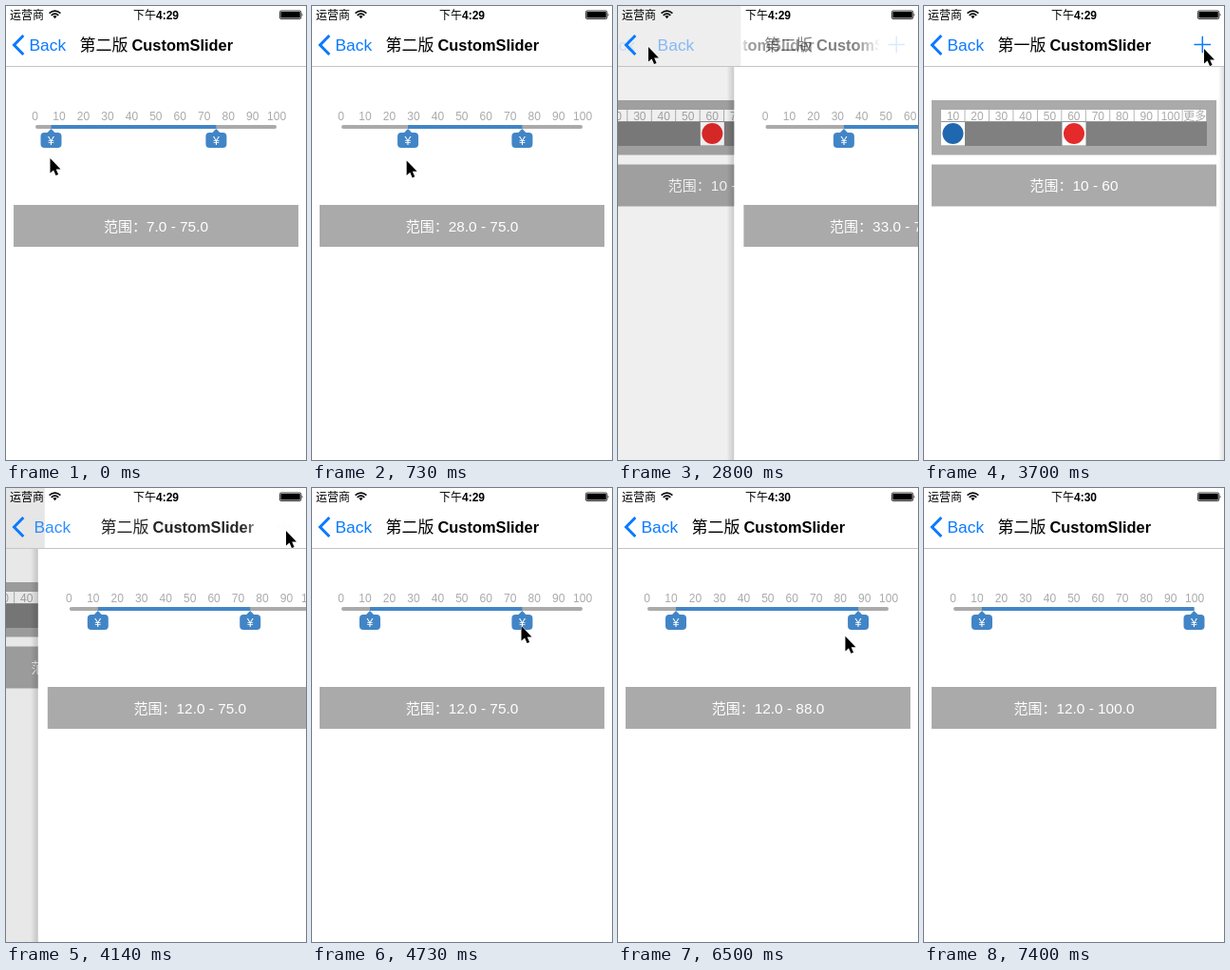
Animation of 316x477 px, one loop 8120 ms. Source, as an HTML page:

```html
<!DOCTYPE html>
<html lang="zh-CN">
<head>
<meta charset="utf-8">
<title>CustomSlider</title>
<style>
  html, body { margin: 0; width: 100%; height: 100%; overflow: hidden; background: #fff; }
  svg { display: block; width: 100vw; height: 100vh; }
  text { font-family: "Liberation Sans", "Noto Sans CJK SC", "Noto Sans CJK", sans-serif; white-space: pre; }
  .mid { text-anchor: middle; }
  .status { font-size: 12px; }
  .bold { font-weight: 700; }
  .title .han { font-size: 17px; font-weight: 500; }
  .title .bold { font-size: 16.4px; }
  .back { font-size: 17.4px; fill: #0a7aff; }
  .tick { font-size: 12px; fill: #aaa; text-anchor: middle; }
  .range { font-size: 15px; font-weight: 300; fill: #fff; text-anchor: middle; }
  .range tspan { font-size: 15.4px; }
  .grey { fill: #aaa; }
  .blue { fill: #4285c6; }
</style>
</head>
<body>
<svg viewBox="0 0 316 477">
  <defs>
    <linearGradient id="edge">
      <stop offset="0" stop-opacity="0"/>
      <stop offset="1" stop-opacity=".16"/>
    </linearGradient>
    <linearGradient id="fadeL" gradientUnits="userSpaceOnUse" x1="68" x2="78">
      <stop offset="0" stop-color="#000"/>
      <stop offset="1" stop-color="#fff"/>
    </linearGradient>
    <linearGradient id="fadeR" gradientUnits="userSpaceOnUse" x1="250" x2="276">
      <stop offset="0" stop-color="#fff"/>
      <stop offset="1" stop-color="#000"/>
    </linearGradient>
    <mask id="maskL" maskUnits="userSpaceOnUse" x="0" y="0" width="316" height="64">
      <rect width="316" height="64" fill="url(#fadeL)"/>
    </mask>
    <mask id="maskR" maskUnits="userSpaceOnUse" x="0" y="0" width="316" height="64">
      <rect width="316" height="64" fill="url(#fadeR)"/>
    </mask>
    <g id="knob">
      <path class="blue" d="M-4.5 133.5L0 129L4.5 133.5Z"/>
      <rect class="blue" x="-11" y="133" width="22" height="16" rx="4"/>
    </g>
  </defs>

  <g id="first">
    <rect x="-2" width="320" height="477" fill="#fff"/>
    <rect class="grey" x="8" y="99" width="300" height="57.5"/>
    <rect x="18" y="121.5" width="280" height="25.5" fill="#808080"/>
    <g id="cells"></g>
    <rect x="18" y="122" width="25" height="24.5" fill="#fff"/>
    <circle cx="30.5" cy="134" r="11" fill="#1f67ae"/>
    <rect x="145.5" y="122" width="25" height="24.5" fill="#fff"/>
    <circle cx="158" cy="134" r="11" fill="#e42a2a"/>
    <rect class="grey" x="8" y="166.5" width="300" height="44"/>
    <text class="range" x="158" y="194.3">范围：<tspan>10 - 60</tspan></text>
  </g>
  <path id="dim"/>

  <g id="second">
    <rect x="-10" y="64" width="8" height="413" fill="url(#edge)"/>
    <rect x="-2" width="330" height="477" fill="#fff"/>
    <g id="ticks"></g>
    <rect class="grey" x="31" y="125" width="254" height="4" rx="2"/>
    <rect id="span" class="blue" y="125" height="4"/>
    <g id="low"><use href="#knob"/><text class="mid" y="145.6" font-size="12.5" fill="#fff">¥</text></g>
    <g id="high"><use href="#knob"/><text class="mid" y="145.6" font-size="12.5" fill="#fff">¥</text></g>
    <rect class="grey" x="8" y="209" width="300" height="44"/>
    <text class="range" x="158" y="236.6">范围：<tspan id="value"></tspan></text>
  </g>

  <path id="barDim"/>
  <rect y="63" width="316" height="1" fill="#c4c4c4"/>
  <g mask="url(#maskL)">
    <g id="title1" class="title">
      <text class="han" x="77.5" y="47.3">第一版</text><text class="bold" x="132.5" y="47">CustomSlider</text>
    </g>
  </g>
  <g mask="url(#maskR)">
    <g id="title2" class="title">
      <text class="han" x="77.5" y="47.3">第二版</text><text class="bold" x="132.5" y="47">CustomSlider</text>
    </g>
  </g>
  <text id="back1" class="back" x="24.5" y="47">Back</text>
  <text id="back2" class="back" x="24.5" y="47">Back</text>
  <path d="M18.3 31L8.5 41L18.3 51" fill="none" stroke="#0a7aff" stroke-width="3"/>
  <path id="plus" d="M284.5 40.5H302M293.3 31.8V49.2" stroke="#0a7aff" stroke-width="1.5"/>

  <text class="status" x="4" y="13.6">运营商</text>
  <g fill="none" stroke="#000" stroke-width="1.7">
    <path d="M45.6 7.6Q51.5 2.6 57.4 7.6M47.7 9.8Q51.5 6.6 55.3 9.8"/>
    <path d="M49.4 10.8Q51.5 9.3 53.6 10.8L51.5 13.2Z" fill="#000" stroke="none"/>
  </g>
  <text class="status mid" x="158" y="13.6" font-weight="500">下午<tspan id="clock" class="bold"></tspan></text>
  <rect x="288.4" y="5" width="22.4" height="8.6" rx="1.5" fill="none" stroke="#000" stroke-width=".8"/>
  <rect x="289.4" y="6" width="20.4" height="6.6" rx=".6"/>
  <path d="M311.6 7.6Q313.4 9.3 311.6 11Z"/>

  <path id="cursor" d="M0 0V15.6L3.6 12.4L6 18L8.6 16.9L6.2 11.4H11Z" stroke="#fff" stroke-width="1" paint-order="stroke"/>
</svg>

<script>
const LOOP = 8120, STEP = 148, SLIDE = 350;
const $ = id => document.getElementById(id);
const clamp = v => Math.min(1, Math.max(0, v));
const ease = v => 0.5 - 0.5 * Math.cos(Math.PI * clamp(v));

// Each key is [step, value, ...]; values ease from key to key.
const pointer = [
  [0, 46.5, 160], [7, 112, 163], [8, 112, 163], [11, 302.5, 441], [12, 298, 428],
  [16, 40, 59], [17, 32, 43], [19, 32, 43], [25, 295, 45], [28, 295, 45],
  [30, 248, 100], [31, 248, 100], [32, 220.5, 145], [39, 99, 159.5],
  [46, 272, 155], [47, 272, 155], [49, 291, 413]
];
const lowKeys = [[0, 47.5], [7, 113.5]];
const highKeys = [[32, 221.4], [39, 117.5], [46, 284.5]];

function at(keys, n) {
  if (n <= keys[0][0]) return keys[0].slice(1);
  const i = keys.findIndex(k => k[0] > n);
  if (i < 0) return keys[keys.length - 1].slice(1);
  const a = keys[i - 1], b = keys[i];
  const e = ease((n - a[0]) / (b[0] - a[0]));
  return a.slice(1).map((v, j) => v + (b[j + 1] - v) * e);
}

const move = (id, x, y = 0) => $(id).setAttribute("transform", `translate(${x} ${y})`);
const fade = (id, v) => $(id).setAttribute("opacity", clamp(v));
const amount = x => Math.ceil((x - 31) / 2.54).toFixed(1);

function build() {
  let cells = "", ticks = "";
  for (let i = 0; i <= 10; i++) {
    const x = 18 + i * 280 / 11;
    cells += `<rect x="${x}" y="109" width="24.6" height="12" fill="#fff"/>` +
      `<text class="tick" x="${x + 12.6}" y="119.5">${i < 10 ? (i + 1) * 10 : "更多"}</text>`;
    ticks += `<text class="tick" x="${30.6 + i * 25.45}" y="119.6">${i * 10}</text>`;
  }
  $("cells").innerHTML = cells;
  $("ticks").innerHTML = ticks;
}

// p is 0 with the second page shown, 1 with the first page shown.
function drawPages(p) {
  const x = 320 * p, moving = p > 0 && p < 1;
  move("first", -96 * (1 - p));
  move("second", x);
  $("dim").setAttribute("d", `M0 64H${x}V477H0Z`);
  $("barDim").setAttribute("d", `M0 0H${x + 5}V63H0Z`);
  fade("dim", moving ? 0.1 * (1 - p) : 0);
  fade("barDim", moving ? 0.11 * (1 - p) : 0);

  const left = 68 + 100 * (1 - p);
  $("fadeL").setAttribute("x1", left);
  $("fadeL").setAttribute("x2", left + 9);
  move("title1", -53 * (1 - p));
  fade("title1", p);
  move("title2", 197 * p);
  fade("title2", 1 - 1.3 * p);
  move("back1", -74 * (1 - p));
  fade("back1", p * p);
  move("back2", 44 * p);
  fade("back2", 1 - 1.4 * p);
  fade("plus", p * p);
}

function draw(t) {
  const n = Math.floor((t + 15) / STEP), time = n * STEP;
  drawPages(n < 24 ? ease((time - 2662) / SLIDE) : 1 - ease((time - 3870) / SLIDE));

  const low = n < 26 ? at(lowKeys, n)[0] : 61;
  const high = at(highKeys, n)[0];
  move("low", low);
  move("high", high);
  $("span").setAttribute("x", low);
  $("span").setAttribute("width", high - low);
  $("value").textContent = `${amount(low)} - ${amount(high)}`;
  $("clock").textContent = n < 36 ? "4:29" : "4:30";

  move("cursor", ...at(pointer, n));
  fade("cursor", n < 50 ? 1 : 0);
}

build();
const start = performance.now();
function tick() {
  draw((performance.now() - start) % LOOP);
  requestAnimationFrame(tick);
}
tick();
</script>
</body>
</html>
```
